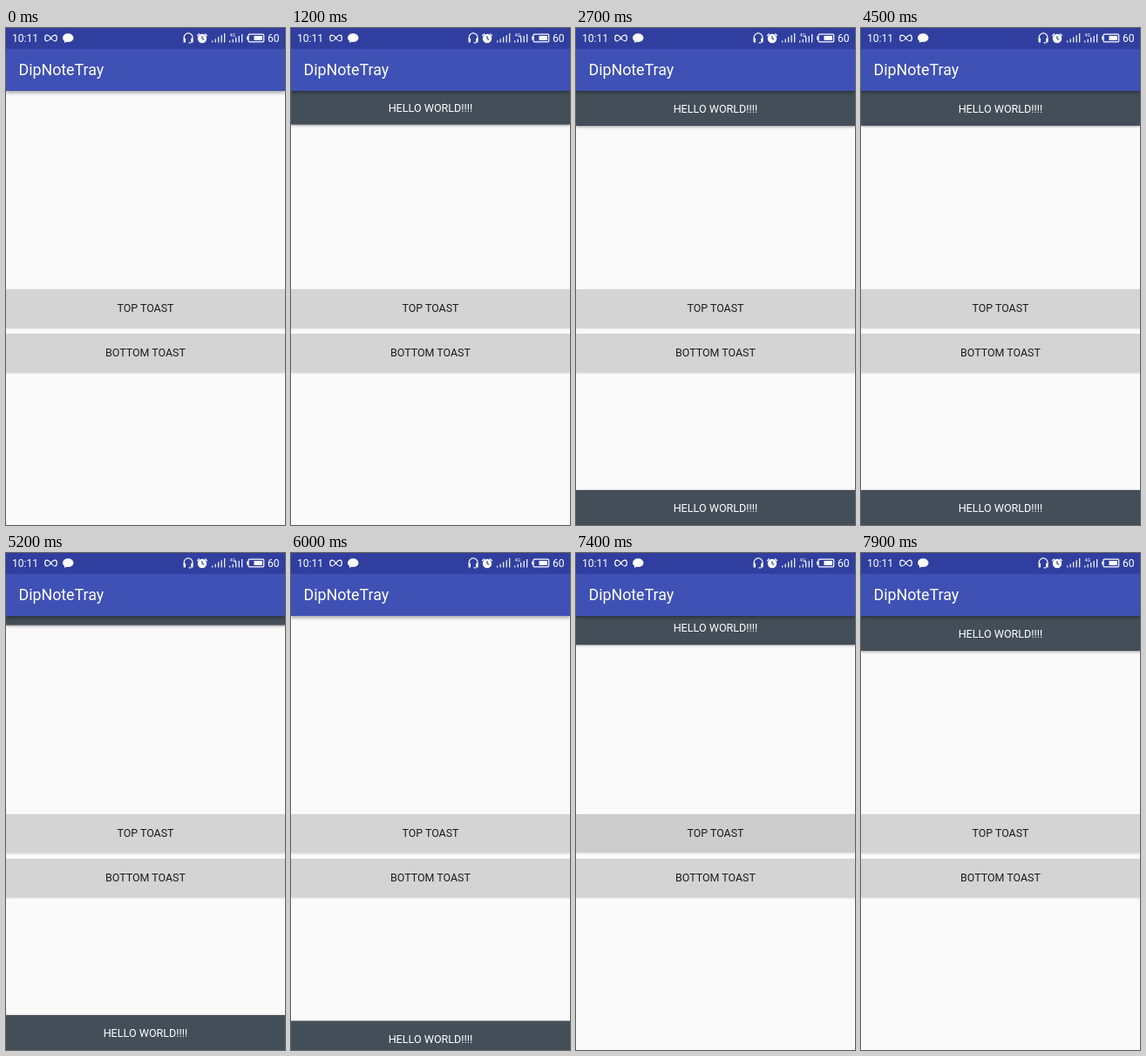
Write an HTML page that moves like this. It is 320 px wide and 569 px high and loops after 8 s.

```html
<!DOCTYPE html>
<html lang="en">
<head>
<meta charset="utf-8">
<title>Toast demo</title>
<style>
  html, body { margin: 0; width: 100%; height: 100%; overflow: hidden; background: #fafafa; }
  body { position: relative; font: 12.45px Roboto, sans-serif; color: #fff; }
  body > * { position: absolute; left: 0; width: 320px; text-align: center; }
  #status { top: 0; height: 24px; background: #303f9f; z-index: 3; }
  #appbar {
    top: 24px; height: 48px; z-index: 2; box-sizing: border-box; padding-left: 14.5px;
    font-size: 17.8px; line-height: 47px; text-align: left;
    background: #3f51b5; box-shadow: 0 2px 4px rgba(0, 0, 0, .38);
  }
  .button { height: 44px; line-height: 44px; color: #1c1c1c; background: #d4d4d4; }
  #topButton { top: 299px; }
  #bottomButton { top: 350px; }
  .toast {
    height: 40px; font-size: 12.6px; line-height: 41px; background: #434e59; z-index: 1;
    box-shadow: 0 1px 3px rgba(0, 0, 0, .4);
  }
  #topToast { top: 72px; }
  #bottomToast { top: 529px; }
</style>
</head>
<body>
<svg id="status" viewBox="0 0 320 24" fill="none" stroke="#fff" stroke-width="1.2">
  <g fill="#fff" stroke="none" font-size="12.1" text-anchor="start">
    <text x="7" y="16">10:11</text>
    <text x="300" y="16">60</text>
    <text x="256.5" y="9.8" font-size="5.4">4G</text>
    <ellipse cx="71.2" cy="11.2" rx="6.2" ry="4.9"/>
    <path d="M67 13v4l4-2z"/>
    <path id="data" d="M261.5 10.5h3l-1.5-2.5z"/>
    <path d="M276.2 9.5h1.6v4h-1.6zM284.5 9h9.5v5h-9.5z"/>
    <circle cx="225" cy="12" r="5.2"/>
  </g>
  <path d="M51.5 11.5C48.5 7 44.7 7 44.7 11.5S48.5 16 51.5 11.5S58.3 7 58.3 11.5S54.5 16 51.5 11.5z"/>
  <path d="M204.2 13v-2.2a4.9 4.9 0 0 1 9.8 0V13"/>
  <path d="M204.8 11.8v4.6M213.4 11.8v4.6" stroke-width="2.4"/>
  <path d="M212.4 16.9h-2.8"/>
  <path d="M225 9v3.2l2.2 1.1" stroke="#303f9f"/>
  <path d="M219.2 9l2.7-2.6M230.8 9l-2.7-2.6"/>
  <g id="bars"></g>
  <rect x="278.1" y="7.2" width="17.6" height="8.6" rx="1"/>
</svg>
<div id="appbar">DipNoteTray</div>
<div id="topButton" class="button">TOP TOAST</div>
<div id="bottomButton" class="button">BOTTOM TOAST</div>
<div id="topToast" class="toast">HELLO WORLD!!!!</div>
<div id="bottomToast" class="toast">HELLO WORLD!!!!</div>
<script>
const LOOP = 8000, STEP = 100, HEIGHT = 40;
const $ = id => document.getElementById(id);
const clamp = x => Math.max(0, Math.min(1, x));
const progress = (t, start, end) => clamp((t - start) / (end - start));
const slideIn = (t, start, end) => 1 - (1 - progress(t, start, end)) ** 3;
const slideOut = (t, start, end) => 1 - progress(t, start, end) ** 2.6;

function signal(left, tallest) {
  let path = '';
  for (let i = 0; i < 5; i++) {
    path += `M${left + i * 3.5} 16.5v${-(2 + (tallest - 2) * i / 4)}`;
  }
  return `<path d="${path}"/>`;
}
$('bars').innerHTML = signal(236.7, 10.5) + signal(256.7, 9.5);

function placeToast(id, shown, side) {
  const style = $(id).style;
  style.visibility = shown > 0 ? 'visible' : 'hidden';
  style.transform = `translateY(${side * HEIGHT * (1 - shown)}px)`;
}

// A tap lifts the button at once; its tint fades in and out.
function pressButton(id, age) {
  const active = age >= 0 && age < 600;
  const lift = active ? 1 - age / 600 : 0;
  const tint = active ? .04 * Math.sin(Math.PI * age / 600) : 0;
  const style = $(id).style;
  style.boxShadow = `0 ${1 + lift}px ${2 + lift}px rgba(0,0,0,.18), ` +
    `inset 0 0 0 44px rgba(0,0,0,${tint})`;
}

function draw(now) {
  const t = Math.floor(now % LOOP / STEP) * STEP;
  const top = t < 4400 ? slideIn(t, 600, 1500)
    : t < 7000 ? slideOut(t, 4400, 5300)
    : slideIn(t, 7000, 7900);
  const bottom = t < 5600 ? slideIn(t, 1800, 2700) : slideOut(t, 5600, 6400);
  placeToast('topToast', top, -1);
  placeToast('bottomToast', bottom, 1);
  pressButton('topButton', t < 7000 ? t - 600 : t - 7000);
  pressButton('bottomButton', t - 1700);
  $('data').style.opacity = Math.floor((t + 300) / 1000) % 2;
  requestAnimationFrame(draw);
}
draw(0);
</script>
</body>
</html>
```
